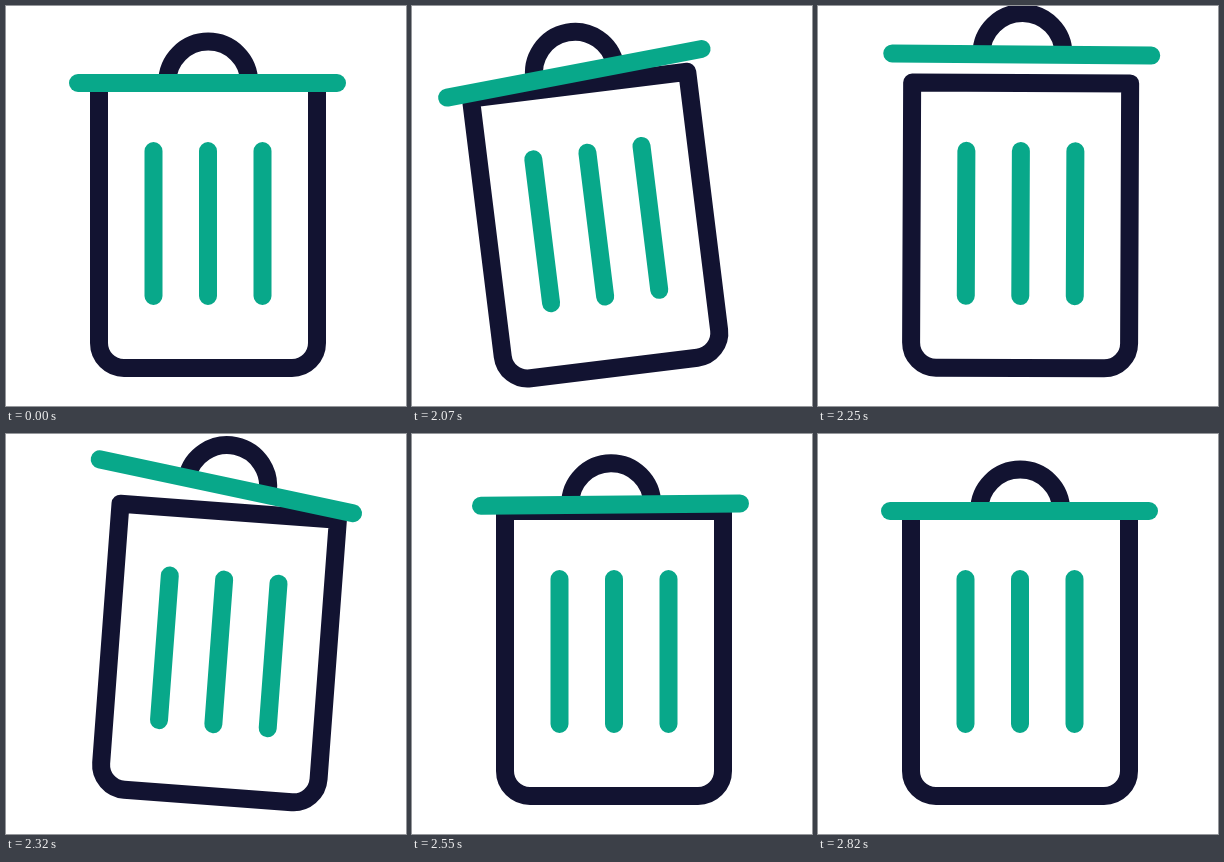
An HTML page that plays this animation: 400 px wide and 400 px high, repeating every 2850 ms.

```html
<!DOCTYPE html>
<html lang="en">
<head>
<meta charset="utf-8">
<title>Trash bin</title>
<style>
  html, body { margin: 0; width: 100%; height: 100%; overflow: hidden; background: #fff; }
  svg { display: block; width: 100%; height: 100%; }
  path { fill: none; stroke: #121331; stroke-width: 18; stroke-linejoin: round; }
  .green { stroke: #08a88a; stroke-linecap: round; }
</style>
</head>
<body>
<svg viewBox="0 0 400 400">
  <g id="bin">
    <path d="M93 77H311V337a25 25 0 0 1-25 25H118a25 25 0 0 1-25-25Z"/>
    <path class="green" d="M147.5 145V290M202 145V290M256.5 145V290"/>
    <g id="lid">
      <path d="M161.2 76.6a41 41 0 0 1 82 0"/>
      <path class="green" d="M72 77H331"/>
    </g>
  </g>
</svg>
<script>
const LOOP = 2850, START = 2020, END = 2820;
const bin = document.getElementById('bin');
const lid = document.getElementById('lid');

const smooth = u => u * u * (3 - 2 * u);

// A swing runs from rest through eased turning points [time, value]
function swing(from, ...turns) {
  return t => {
    let time = from, value = 0;
    for (const [nextTime, next] of turns) {
      if (t < nextTime) return value + (next - value) * smooth((t - time) / (nextTime - time));
      time = nextTime;
      value = next;
    }
    return value;
  };
}

const binTilt = swing(1945, [2145, -10.3], [2300, 4.5], [2445, 0]);
const lidTilt = swing(2000, [2155, -8.8], [2325, 7.8], [2600, -1.5], [END, 0]);
const lidShift = swing(1955, [2160, -4.6], [2240, 1], [2395, -9], [2640, 0]);
const lidLift = swing(1955, [2210, -29], [2690, 0]);

// Poses advance 40 times a second, shown on whole hundredths
function snap(t) {
  const pose = Math.floor((t - START - 5) / 25 + 0.2);
  return START + 25 * Math.max(0, pose);
}

function draw(time) {
  const t = time < START ? END : snap(time);
  bin.setAttribute('transform', `rotate(${binTilt(t)} 202 362)`);
  lid.setAttribute('transform',
    `translate(${lidShift(t)} ${lidLift(t)}) rotate(${lidTilt(t)} 202 77)`);
}

const begin = performance.now();
function tick() {
  draw((performance.now() - begin) % LOOP);
  requestAnimationFrame(tick);
}
tick();
</script>
</body>
</html>
```
